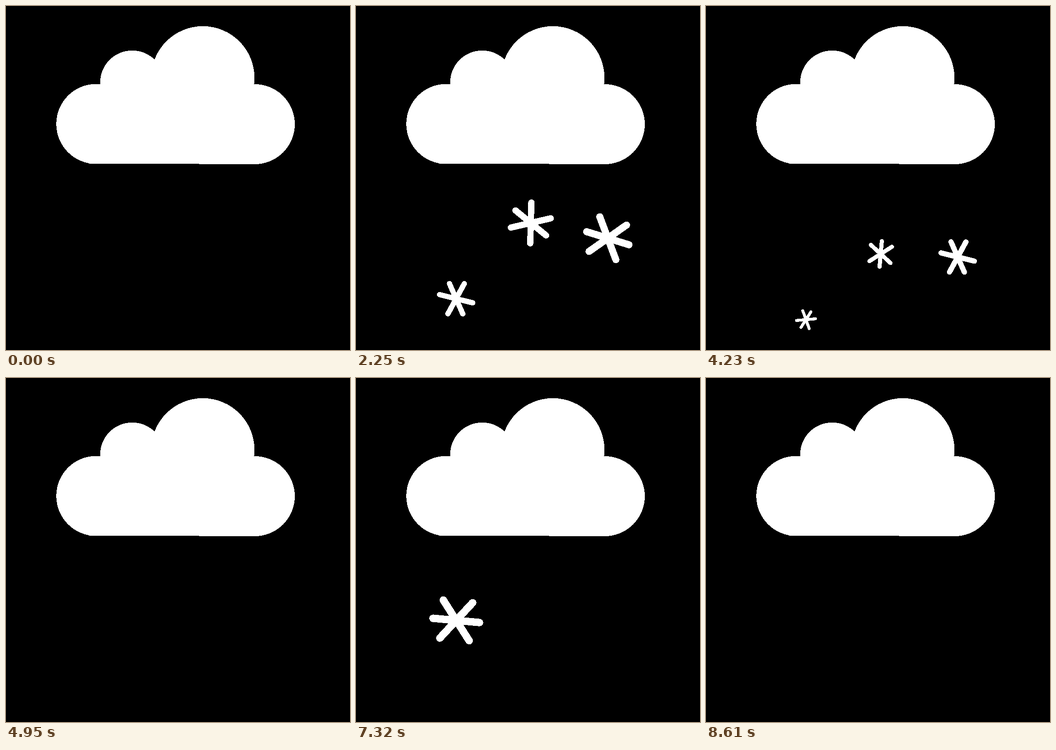
An HTML page for the animation above (9000 ms loop, 748x748 px).

```html
<!DOCTYPE html>
<html>
<head>
<meta charset="utf-8">
<title>Snow cloud</title>
<style>
  html, body { margin: 0; height: 100%; overflow: hidden; background: #000; }
  svg { display: block; width: 100vw; height: 100vh; }
</style>
</head>
<body>
<svg viewBox="0 0 748 748" shape-rendering="crispEdges" fill="#fff">
  <circle cx="196.3" cy="256.5" r="87"/>
  <circle cx="274.5" cy="166.5" r="69.7"/>
  <circle cx="428" cy="156.2" r="112.3"/>
  <circle cx="541" cy="257" r="87"/>
  <path d="M196 170H541V344H420V343H181V256Z"/>
  <defs>
    <path id="flake" d="M-42.6 -32.9L42.6 32.9M-42.6 32.9L42.6 -32.9M0 -52V52"
      stroke="#fff" stroke-width="16.6" stroke-linecap="round"/>
  </defs>
</svg>
<script>
const LOOP = 9000, STEP = 30, FALL = 1200, HIDDEN = 120;
const starts = [0, 1800, 3540, 5400, 7200];

const easeOut = x => 1 - (1 - x) ** 2.5;
const easeInOut = x => x < .5 ? (2 * x) ** 2.65 / 2 : 1 - (2 - 2 * x) ** 2.65 / 2;

const flakes = [
  { x: 217, top: 472, drop: 238, delay: 0, ease: easeOut },
  { x: 379.3, top: 451, drop: 202, delay: 120, ease: easeInOut },
  { x: 546.6, top: 498.7, drop: 202, delay: 240, ease: easeInOut }
];

const svg = document.querySelector('svg');
for (const flake of flakes) {
  flake.node = document.createElementNS(svg.namespaceURI, 'use');
  flake.node.setAttribute('href', '#flake');
  svg.append(flake.node);
}

function draw(now) {
  const time = Math.floor(now % LOOP / STEP) * STEP;
  const start = starts.findLast(s => s <= time);
  for (const { node, x, top, drop, delay, ease } of flakes) {
    // The middle flake is timed on the cycle clock minus its own delay, like the others.
    const age = time - start - delay;
    const visible = age >= HIDDEN && age < FALL - STEP;
    node.setAttribute('visibility', visible ? 'visible' : 'hidden');
    if (!visible) continue;
    const progress = age / FALL;
    const scale = (1 + Math.cos(Math.PI * progress)) / 2;
    const angle = 155.7 + age / 30 - 69 * Math.cos(Math.PI * age / 1040);
    node.setAttribute('transform',
      `translate(${x + scale} ${top + drop * ease(progress)}) rotate(${angle}) scale(${scale})`);
  }
}

function tick() {
  draw(performance.now());
  requestAnimationFrame(tick);
}
tick();
</script>
</body>
</html>
```
